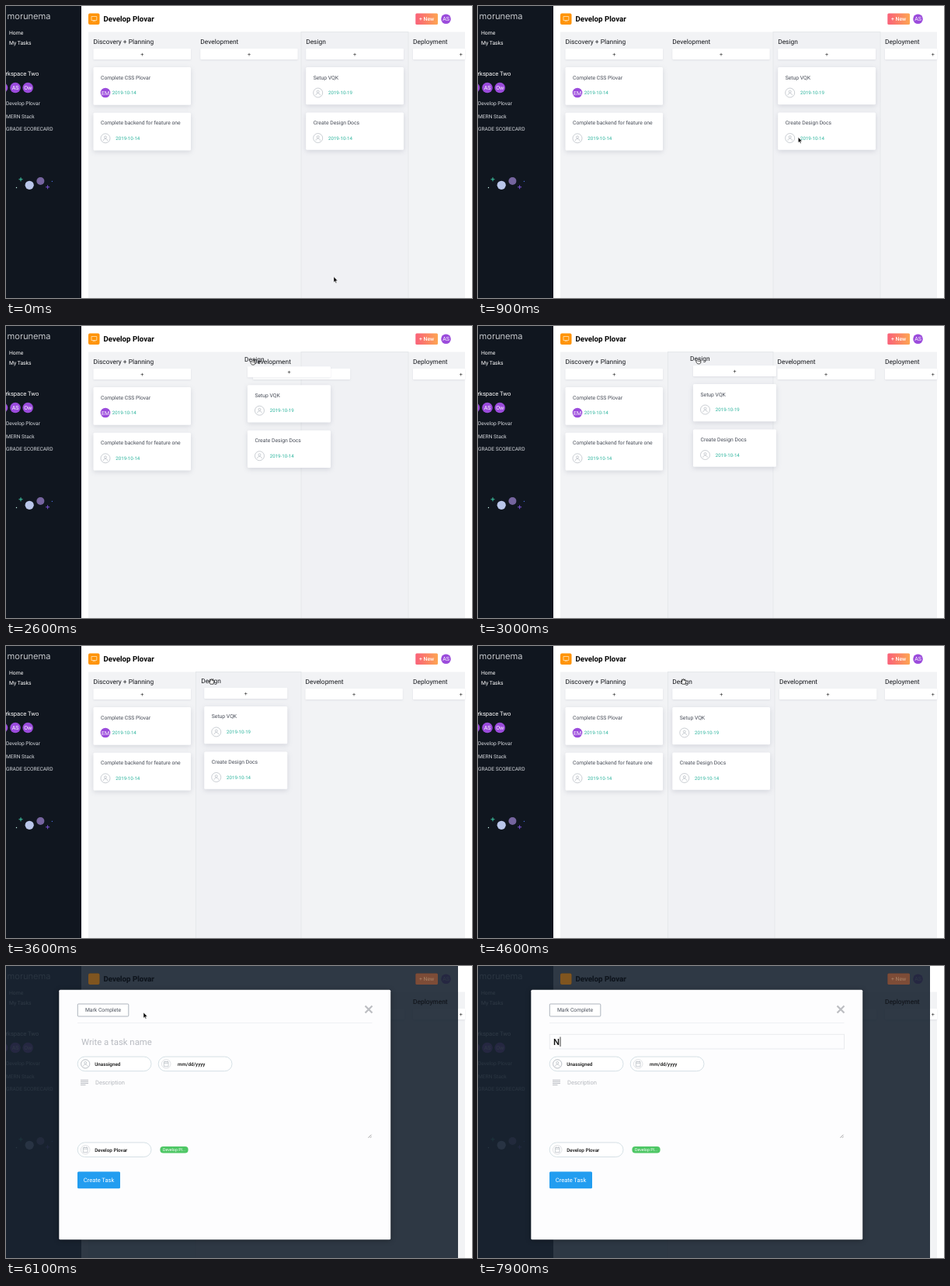
Write an HTML page that moves like this. It is 600x377 px and loops after 8 s.

```html
<!DOCTYPE html>
<html lang="en">
<head>
<meta charset="utf-8">
<title>Task board</title>
<style>
html, body { margin: 0; width: 100%; height: 100%; overflow: hidden; background: #fff; }
svg { display: block; width: 600px; height: 377px; font-family: Roboto, Arial, sans-serif; text-rendering: geometricPrecision; }
.card { fill: #fff; filter: drop-shadow(0 2px 3px rgba(60, 70, 100, .16)); }
.bar { fill: #fff; filter: drop-shadow(0 1px 1px rgba(60, 70, 100, .1)); }
.pill { fill: #fff; stroke: #cbd9df; stroke-width: .8; }
.icon { fill: none; stroke: #b4b9c0; stroke-width: .7; }
</style>
</head>
<body>
<svg id="stage" viewBox="0 0 600 377"></svg>
<script>
const LOOP = 8000, STEP = 100;
const GRAB = 1900, DROP = 3400, SETTLE = 3700, OPEN = 6100, FOCUS = 6300, TYPE = 7700;
const PROJECT = 'Develop Plovar';
const stage = document.getElementById('stage');

const clamp = v => Math.max(0, Math.min(1, v));
const ease = v => { v = clamp(v); return v * v * (3 - 2 * v); };
const mix = (a, b, k) => a + (b - a) * k;

const text = (x, y, size, fill, str, attrs = '') =>
  `<text x="${x}" y="${y}" font-size="${size}" fill="${fill}" ${attrs}>${str}</text>`;
const rect = (x, y, w, h, attrs) => `<rect x="${x}" y="${y}" width="${w}" height="${h}" ${attrs}/>`;
const circle = (x, y, r, attrs) => `<circle cx="${x}" cy="${y}" r="${r}" ${attrs}/>`;
const path = (d, attrs) => `<path d="${d}" ${attrs}/>`;
const at = (x, y, body) => `<g transform="translate(${x} ${y})">${body}</g>`;
const MID = 'text-anchor="middle"', MEDIUM = 'font-weight="500"';

const avatar = (x, y, r, name) =>
  circle(x, y, r, 'fill="#9b4bdc"') + text(x, y + 2.5, 7, '#fff', name, MID);

const person = (x, y, r = 6) => at(x, y,
  circle(0, 0, r, 'class="icon"') + circle(0, -1.4, 1.5, 'class="icon"') +
  path('M-2.8 3.2C-2.6-.2 2.6-.2 2.8 3.2', 'class="icon"'));

function card(y, w, h, title, date, name) {
  const mid = y + 33;
  return rect(0, y, w, h, 'rx="1.5" class="card"') +
    text(9.5, y + 15.5, 6.8, '#474c57', title) +
    (name ? avatar(15.5, mid, 6.3, name) : person(15.5, mid)) +
    text(name ? 24.3 : 28.8, mid + 2.2, 6.15, '#2ab39c', date);
}

const bar = (w, plus = w / 2) =>
  rect(0, 55, w, 14, 'rx="1" class="bar"') + text(plus, 64.6, 7.2, '#333', '+', MID);
const heading = (x, y, name) => text(x, y, 8.4, '#15171c', name);
const column = (x, name, w, body = '', plus) => heading(x, 48.6, name) + at(x, 0, bar(w, plus) + body);

const designCards = w =>
  card(79, w, 48.3, 'Setup VQK', '2019-10-19') + card(137.5, w, 48.3, 'Create Design Docs', '2019-10-14');

const plus = (x, y, color) => path(`M${x - 2.5} ${y}h5M${x} ${y - 2.5}v5`, `stroke="${color}" stroke-width="1"`);

const sidebar = rect(0, 0, 97, 377, 'fill="#10161f"') +
  text(1.5, 16.6, 11.2, '#f2f4f7', 'morunema', 'font-family="Inter, sans-serif" font-weight="300"') +
  text(4, 37, 6.8, '#fff', 'Home') + text(4, 50.3, 6.8, '#fff', 'My Tasks') +
  text(-.5, 89.7, 7.6, '#fff', 'rkspace Two') +
  avatar(-4.5, 105.5, 6.8, '') + avatar(12, 105.5, 6.8, 'AS') + avatar(28.2, 105.5, 6.8, 'Ow') +
  [PROJECT, 'MERN Stack', 'GRADE SCORECARD']
    .map((s, i) => text(0, 128.2 + i * 16.6, 6.65, '#d5d8dd', s)).join('') +
  plus(19, 223.8, '#3fc7a4') + plus(53.6, 233.8, '#7a4fd0') +
  circle(13.5, 234.5, .7, 'fill="#cfe"') + circle(59.4, 226.4, .7, 'fill="#4668d8"') +
  circle(30.2, 231.3, 5.6, 'fill="#b9c6ea"') + circle(44.4, 226, 5, 'fill="#76659f"');

const header = rect(106, 9.5, 14.5, 14.5, 'rx="2" fill="#ff9408"') +
  path('M110 13.5h6.8v5h-6.8zM112 20.5l1.4-2 1.4 2', 'fill="none" stroke="#ffe6c4" stroke-width=".8"') +
  text(125.5, 20.2, 9.7, '#000', PROJECT, 'font-weight="700"') +
  '<linearGradient id="warm"><stop stop-color="#f9617a"/><stop offset="1" stop-color="#fda552"/></linearGradient>' +
  rect(527.3, 9.5, 28.7, 14.5, 'rx="1.5" fill="url(#warm)"') +
  text(541.6, 19.2, 6.8, '#fff', '+ New', MID + MEDIUM) + avatar(566.5, 16.7, 6.3, 'AS');

const firstColumn = column(112.5, 'Discovery + Planning', 125.5,
  card(79, 125.5, 48.8, 'Complete CSS Plovar', '2019-10-14', 'EM') +
  card(137.8, 125.5, 48.8, 'Complete backend for feature one', '2019-10-14'));

const lastColumn = column(524, 'Deployment', 67, '', 61.8);

// Cursor stops: time, x, y
const stops = [[100, 422, 349.5], [1500, 406, 52.5], [1700, 406, 52.5], [1900, 397, 50], [3000, 284, 46],
  [3400, 265, 46], [4900, 265, 46], [5800, 177, 60], [6100, 177, 60], [6300, 165, 97.5]];

function cursorAt(t) {
  const i = stops.findIndex(s => s[0] > t);
  if (i < 0) return stops[stops.length - 1].slice(1);
  if (!i) return stops[0].slice(1);
  const [t0, x0, y0] = stops[i - 1], [t1, x1, y1] = stops[i];
  const k = ease((t - t0) / (t1 - t0));
  return [mix(x0, x1, k), mix(y0, y1, k)];
}

const arrow = path('M0 0V7.2l1.6-1.5 1.1 2.5 1.1-.5-1.1-2.4h2.3z', 'fill="#000" stroke="#fff" stroke-width=".5"');
const fist = path('M-2.6-1.2c.3-1.5 5-1.5 5.4 0v2.4c0 2.2-4.7 2.2-5.2.3l-.9-1.6zM-1-.8v1M.5-.9v1M1.8-.8v1',
  'fill="#fff" stroke="#000" stroke-width=".7"');
const palm = path('M-2 3.2l-1.9-3.1c.3-.9 1.2-.3 1.7.5l-.6-3c.6-1 1.2-.2 1.5.8l.1-1.5c.6-.8 1.1-.4 1.2.2l.3 1.3.5-1.2c.7-.5 1 0 .9.7l-.1 1.2.7-.6c.7.2.8.8.6 1.5l-.9 3.2z',
  'fill="#fff" stroke="#000" stroke-width=".7"');
const beam = path('M-1.5-5Q0-5 0-4V4Q0 5-1.5 5M1.5-5Q0-5 0-4M0 4Q0 5 1.5 5', 'fill="none" stroke="#222" stroke-width=".7"');

function pointer(t, x, y) {
  if (t >= TYPE) return '';
  const shape = t >= FOCUS ? beam
    : t >= GRAB && t < DROP ? fist
    : t >= DROP && t < OPEN && y < 50 && x > 249 ? palm : arrow;
  return at(x, y, shape);
}

function board(t, x, y) {
  const moved = ease((t - 2450) / 300), dragging = t >= GRAB && t < SETTLE, settled = t >= SETTLE;
  const [left, right] = x < 244 ? [106.5, 244] : settled ? [244.5, 382] : moved > .5 ? [244.5, 380] : [380, 518];
  let out = rect(106, 33.5, 485, 344, 'fill="#f2f3f5"') +
    rect(left, 33.5, right - left, 350, 'fill="#f0f1f4" stroke="#e3e5e9" stroke-width=".8"') +
    firstColumn + lastColumn +
    column(settled ? 388 : mix(250.3, 385.5, moved), 'Development', 125.3);
  if (!dragging) return out + column(settled ? 250.3 : 386.2, 'Design', 125.8, designCards(125.8));
  const k = ease((t - DROP) / (SETTLE - DROP));
  const titleX = mix(x - 11, 250.3, k), dy = mix(y - 50, 0, k);
  return out + heading(titleX, 48.6 + dy, 'Design') +
    at(titleX + 4, dy, bar(107) + designCards(107));
}

const pill = (x, y, label, icon) =>
  rect(x, y, 94.8, 18.6, 'rx="9.3" class="pill"') + circle(x + 10, y + 9.3, 5.8, 'class="icon" opacity=".6"') +
  icon + text(x + (x > 100 ? 24.8 : 22), y + 11.7, 6.3, '#111', label, MEDIUM);
const sheet = (x, y) => path(`M${x - 2.8} ${y - 3}h5.6v6.2h-5.6zM${x - 2.8} ${y - 1.2}h5.6M${x - 1.3} ${y - 4}v1.5M${x + 1.3} ${y - 4}v1.5`, 'class="icon"');

const dialog = rect(0, 0, 582, 377, 'fill="rgba(25,36,49,.9)"') +
  rect(106, 9.5, 14.5, 14.5, 'rx="2" fill="#80551f"') +
  rect(527.3, 9.5, 28.7, 14.5, 'rx="1.5" fill="#7d4c37"') + text(541.6, 19.2, 6.8, '#a98468', '+ New', MID) +
  text(125.5, 20.2, 9.7, '#10161e', PROJECT, 'font-weight="700"') + heading(524, 48.6, 'Deployment') +
  rect(68.3, 30.8, 426.9, 322.4, 'rx="1.5" fill="#fdfdfe" style="filter:drop-shadow(0 1px 3px rgba(0,0,0,.35))"') +
  rect(92.3, 49, 65.5, 16, 'rx="1" fill="#fff" stroke="#9aa1ac" stroke-width=".8"') +
  text(125, 59.4, 6.8, '#4a505b', 'Mark Complete', MID) +
  path('M462.5 51.5l9 9m0-9l-9 9', 'stroke="#bcbec2" stroke-width="2.2"') +
  path('M92 73.5h379.5', 'stroke="#eceef0" stroke-width=".8"') +
  pill(92.2, 117.1, 'Unassigned', person(102.2, 126.4, 5.5)) +
  pill(196.2, 117.1, 'mm/dd/yyyy', sheet(206.2, 126.6)) +
  path('M96 147.3h10M96 149.4h10M96 151.5h10M96 153.6h6.5', 'stroke="#a9adb4" stroke-width=".8"') +
  text(115, 152.8, 7.5, '#b4b7bd', 'Description') +
  path('M466.5 221.8l4-4M469 221.8l1.5-1.5', 'stroke="#777" stroke-width=".7"') +
  pill(92.2, 227.9, PROJECT, sheet(102.2, 237.4)) +
  rect(198.4, 233, 36.2, 8.5, 'rx="4" fill="#4ec765"') + text(216.5, 239, 5.3, '#fff', 'Develop Pl...', MID) +
  rect(92, 265.5, 55, 21.8, 'rx="1.5" fill="#229df0"') + text(119.5, 278.9, 7.5, '#fff', 'Create Task', MID);

function field(t) {
  const typed = t >= TYPE, focused = t >= FOCUS;
  const caretX = typed ? 105.6 : 97.3;
  const caretOn = focused && (typed || (t - FOCUS) % 1000 < 500);
  return (focused ? rect(92.2, 88.2, 379.2, 18.8, 'fill="none" stroke="#e4e7ea" stroke-width=".8"') : '') +
    (typed ? text(97, 101.6, 11.3, '#111', 'N', MEDIUM) : text(97, 101.6, 11.35, '#b8bbc1', 'Write a task name')) +
    (caretOn ? rect(caretX, 91.5, .8, 12.5, 'fill="#111"') : '');
}

function scene(t) {
  const [x, y] = cursorAt(t);
  return sidebar + header + board(t, x, y) + (t >= OPEN ? dialog + field(t) : '') + pointer(t, x, y);
}

const start = performance.now();
let shown = -1;
function tick() {
  const t = Math.floor((performance.now() - start) % LOOP / STEP) * STEP;
  if (t !== shown) stage.innerHTML = scene(shown = t);
  requestAnimationFrame(tick);
}
tick();
</script>
</body>
</html>
```
